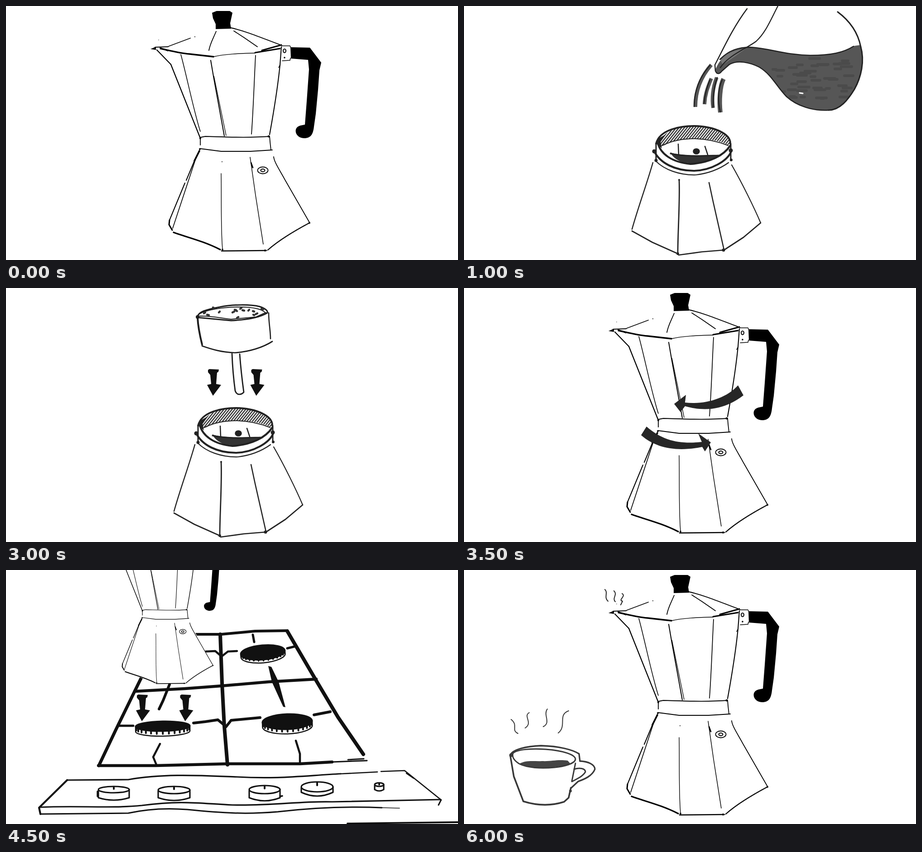
An HTML page that plays this animation: 998 by 561 pixels, repeating every 6.5 s.

```html
<!DOCTYPE html>
<html lang="en">
<head>
<meta charset="utf-8">
<title>Moka pot</title>
<style>
html, body { margin: 0; width: 100%; height: 100%; overflow: hidden; background: #fff; }
svg { display: block; width: 100%; height: 100%; }
</style>
</head>
<body>
<svg id="stage" viewBox="0 0 998 561" fill="none" stroke-linecap="round" stroke-linejoin="round"></svg>
<script>
const STEP = 500;
const stage = document.getElementById('stage');

const line = (d, w = 2) => `<path d="${d}" stroke-width="${w}"/>`;
const solid = (d, c = 'currentColor') => `<path d="${d}" fill="${c}" stroke="none"/>`;
const dot = (x, y, r) => `<circle cx="${x}" cy="${y}" r="${r}" fill="currentColor" stroke="none"/>`;
const oval = (x, y, rx, ry, w = 2, fill = 'none') =>
  `<ellipse cx="${x}" cy="${y}" rx="${rx}" ry="${ry}" stroke-width="${w}" fill="${fill}"/>`;
const ink = (color, ...parts) => `<g color="${color}" stroke="${color}">${parts.join('')}</g>`;
const at = (transform, part) => `<g transform="${transform}">${part}</g>`;
const range = (n, f) => Array.from({ length: n }, (_, i) => f(i)).join('');

function random(seed) {
  return () => (seed = seed * 16807 % 2147483647) / 2147483647;
}

function makePot() {
  return ink('#000',
    solid('M333 94L464 46 495 46 609 88 582 290 590 330 670 479 577 541 475 541 365 497 359 480 428 310 428 290 364 129Z', '#fff'),
    solid('M455 15L465 11 494 11 500 15 495 38 497 50 463 51 463 40 457 27Z'),
    line('M496 48C532 56 568 72 609 87', 1.8),
    line('M464 56C456 75 451 82 448 98M503 55L526 70 555 90M407 71Q375 83 359 89', 1.8),
    dot(417, 68, 1), dot(337, 75, .7),
    solid('M319 95L331 90 331 97Z'),
    line('M329 91L358 90M340 92L357 99M333 97L364 129', 2.2),
    line('M364 129L429 292', 2.2),
    line('M341 94C360 98 382 104 405 106L458 112', 3.4),
    line('M458 112C478 107 520 104 550 104', 1.5),
    line('M550 103L605 94M565 98L608 86', 3),
    line('M386 107C398 150 414 230 429 277', 1.6),
    line('M452 120L458 155 482 287', 2),
    line('M459 155L486 286', 1.3),
    line('M551 109C548 165 546 230 542 283', 1.7),
    line('M605 130C600 180 590 240 582 284M608 90L605 130', 2.1),
    line('M609 88L627 88 630 95M610 121L627 120 628 115M602 136L605 130', 1.5),
    oval(615, 99, 3, 4, 2), dot(615, 114, 1.8),
    solid('M628 91L671 92 696 125 692 142 689 185 684 238 680 266C678 286 671 292 658 292C639 292 632 269 650 264L660 262 664 210 669 140 667 119 629 116Z'),
    line('M430 290L440 288C480 289 530 292 582 288L583 300 585 318M429 292V307', 1.8),
    line('M429 315L475 321 540 321 588 318', 1.8),
    dot(429, 292, 2.2), dot(580, 288, 2.4), dot(428, 316, 2),
    line('M427 320L416 342', 3.8),
    line('M416 342L398 385M395 391L361 473', 2),
    line('M418 340L368 491', 1.7),
    line('M361 473L360 483 367 495', 3),
    line('M370 500C400 511 436 519 473 538', 3.2),
    line('M476 541L575 540', 2.5),
    line('M578 539C605 515 640 495 670 479', 2.3),
    line('M591 333C592 345 606 365 616 384L670 478', 1.8),
    line('M475 370C476 420 474 490 478 536', 1.4),
    line('M539 334L551 418 568 526', 1.5),
    line('M541 346L545 357', 2.6),
    dot(477, 344, 1), dot(670, 479, 2), dot(478, 538, 2), dot(572, 540, 2.2),
    oval(567, 363, 11.5, 7.5, 1.8), oval(567, 363, 4.5, 3, 2));
}

function makeBase() {
  const band = 'M428 304C444 271 478 266 510 266C560 267 586 282 588 303L583 307C566 298 540 293 510 293C482 293 458 298 438 310Z';
  const hatch = range(34, i => `M${392 + i * 6} 312L${432 + i * 6} 262`);
  return ink('#222',
    `<clipPath id="band"><path d="${band}"/></clipPath>`,
    `<g clip-path="url(#band)">${solid(band, '#e4e4e4')}${line(hatch, 2)}</g>`,
    line('M424 304C432 272 480 265 508 265C555 266 589 283 588 304', 3.8),
    line('M438 308C458 298 482 293 510 293C542 294 568 302 583 308', 2),
    solid('M424 304L431 292 446 283 434 300 437 314Z'),
    solid('M455 323C472 331 530 331 564 329C548 346 510 351 482 345C468 340 459 331 455 323Z', '#333'),
    line('M456 326C490 333 525 331 562 330', 3),
    line('M473 305L474 328M532 310L538 328', 2.5),
    oval(513, 321, 6, 5, 3.5, '#222'),
    line('M428 303C434 326 458 345 500 349C543 346 574 330 588 308', 4.2),
    line('M420 321C433 347 466 364 508 364C546 363 582 342 590 321', 4.2),
    line('M424 343C442 361 475 374 512 373C546 369 570 356 584 346', 2.2),
    line('M424 304L424 342M589 304V341', 3),
    dot(420, 321, 4.5), dot(424, 341, 3.5), dot(589, 319, 4.5), dot(590, 340, 3),
    line('M417 346C404 392 384 446 371 493', 2.4),
    line('M371 497L416 522 472 547', 2.7),
    line('M475 384C477 430 472 500 472 547', 2.8),
    line('M541 390L550 432 574 538', 2.5),
    line('M474 550L525 543 574 539 617 511 655 479', 2.7),
    line('M591 351C614 391 641 446 655 479', 2.2),
    dot(475, 384, 2), dot(472, 547, 3), dot(573, 539, 3.5));
}

function makeJug() {
  const rnd = random(7);
  const marks = range(45, () => {
    const x = 680 + rnd() * 170, y = 116 + rnd() * 95;
    return `M${x.toFixed()} ${y.toFixed()}h${(6 + rnd() * 18).toFixed()}`;
  });
  const water = 'M560 130C575 104 602 91 632 91C675 92 705 108 765 109C810 109 838 104 862 88L876 86C884 112 880 150 862 184C848 207 830 230 805 230C770 232 735 221 712 200C690 178 680 152 652 135C625 123 600 119 585 130L568 146C560 152 555 146 556 138Z';
  return ink('#222',
    solid(water, '#565656'),
    `<clipPath id="water"><path d="${water}"/></clipPath>`,
    `<g clip-path="url(#water)" stroke="#4b4b4b">${line(marks, 6)}</g>`,
    solid('M566 118C579 104 600 96 621 95L600 110 571 130Z', '#777'),
    line('M625 6C592 50 570 100 554 130L555 143C558 151 564 151 569 144L586 129', 2.5),
    line('M693 0C675 35 665 60 645 78C624 94 585 108 566 136', 2.3),
    line('M565 118C585 98 606 91 632 91C680 94 705 108 765 109C810 109 838 103 860 89', 2.5),
    line('M586 129C604 119 630 124 652 135C680 152 690 178 712 200C735 221 770 232 805 230', 2.5),
    line('M825 13C852 33 870 60 876 90C885 122 877 157 862 184C848 207 830 230 805 230', 3),
    `<path d="M741 192L748 193" stroke="#fff" stroke-width="3"/>`,
    `<g stroke="#555" stroke-linecap="butt">${
      line('M546 130C524 155 511 185 511 223', 8)}${
      line('M546 160C538 180 532 195 531 217', 8)}${
      line('M558 158C549 180 547 205 550 225', 8)}${
      line('M573 161C565 177 563 210 566 235', 10)}</g>`,
    line('M543 131C520 157 508 187 508 222M543 163Q533 186 530 215M559 158C550 185 550 206 550 224M570 163C560 185 560 209 566 234', 2.5));
}

function makeBasket() {
  return ink('#1c1c1c',
    line('M423 290C425 280 440 275 472 269C500 263 540 263 560 268C574 273 579 278 577 282C562 291 540 297 497 299L422 292', 3),
    line('M427 284C445 275 475 270 510 269C548 268 565 275 571 280M427 289C455 288 475 294 497 296L552 291 574 281', 2),
    line('M423 292C424 315 429 336 433 352', 4),
    line('M580 282C580 305 584 320 584 339', 2.5),
    line('M433 355C456 363 477 369 505 370C537 368 568 358 588 345', 2.7),
    line('M499 372C500 400 503 432 506 454C510 465 520 463 525 457C521 428 518 400 516 373', 2.8),
    dot(423, 291, 4));
}

function makeGrounds() {
  const spots = [[459, 270], [439, 283], [446, 286], [472, 281], [507, 275], [502, 281], [510, 277], [519, 273],
    [524, 276], [537, 277], [547, 278], [553, 285], [548, 286], [512, 293], [566, 273]];
  return ink('#333', spots.map(([x, y], i) =>
    line(`M${x - 2} ${y}l${2 + i % 3} ${i % 2 ? -2 : 1}`, 4.5)).join(''));
}

function makeScoop() {
  const rnd = random(23);
  const fall = range(24, () => dot((500 + rnd() * 60).toFixed(), (165 + rnd() * 100).toFixed(), 2.5));
  const bowl = 'M552 140C582 112 630 92 672 93C684 130 665 174 628 181C598 184 572 165 552 140Z';
  return ink('#222',
    solid(bowl, '#444'), line(bowl, 3),
    line('M673 94L875 2M677 113L905 8', 3),
    fall, dot(606, 372, 2.5), dot(612, 408, 2.5));
}

function arrows(dx, dy) {
  return at(`translate(${dx} ${dy})`, downArrow + at('translate(95.5 0)', downArrow));
}

function burner(x, y, rx, ry, h, tilt) {
  const teeth = range(13, i => {
    const a = Math.PI * (i + 1) / 14, c = Math.cos(a) * rx, s = Math.sin(a) * ry;
    return `M${c.toFixed(1)} ${(s - 2).toFixed(1)}v${h - 3}`;
  });
  return at(`translate(${x} ${y}) rotate(${tilt})`,
    solid(`M${-rx} 0v${h}A${rx} ${ry} 0 0 0 ${rx} ${h}V0Z`, '#fff') +
    line(`M${-rx} 0v${h}A${rx} ${ry} 0 0 0 ${rx} ${h}V0`, 2.5) +
    line(teeth, 4) + oval(0, 0, rx, ry, 3, '#111'));
}

function knob(x, y, rx, ry, h) {
  return line(`M${x - rx} ${y + 2}V${y + h}Q${x} ${y + h + ry * 1.5} ${x + rx} ${y + h}V${y}`, 3.2) +
    oval(x, y, rx, ry, 3.2) + line(`M${x} ${y - ry + 2}v${ry * .5}`, 4);
}

function makeStove() {
  return ink('#111',
    line('M205 432L242 354 284 268 344 146', 7),
    line('M344 146L420 142 475 142 550 135 621 134', 6),
    line('M621 135L683 241 733 325 789 407', 8),
    line('M204 432L330 432 490 428 650 428 720 424', 6.5),
    line('M720 424L797 421M755 419L790 417', 3),
    line('M473 142L477 250 482 345 489 430', 8),
    line('M284 268L395 262 475 256 580 247 685 241', 6.5),
    line('M250 344H281', 5),
    line('M361 253L347 288 338 307', 6),
    line('M414 338L440 335 467 331M468 331L486 346 497 332 561 326', 6),
    line('M340 384L325 413 332 430M640 377L649 406 649 425', 4.5),
    solid('M579 212L586 214 602 247 617 303 612 302 587 247Z'),
    line('M545 143L548 159M621 173L637 169', 5),
    line('M441 180L462 179 476 191 490 180 510 179', 4.5),
    line('M680 320L716 313', 6),
    burner(387, 184, 48, 15, 7, -3),
    burner(567, 182, 49, 16, 7, -5),
    burner(346, 345, 60, 11, 11, -1),
    burner(621, 335, 55, 17, 10, -2),
    line('M135 464L270 463C350 449 430 454 510 457C600 462 650 455 740 450', 3.2),
    line('M742 450L820 446M828 445L880 443 961 508M884 449L900 460', 2.6),
    line('M135 464L73 525 76 539', 4.2),
    line('M74 524C160 520 230 527 300 520C390 508 430 516 500 519C590 521 650 510 720 512L960 507', 3.2),
    line('M76 539L270 537C310 528 350 525 400 529C480 537 530 540 600 534C680 525 760 522 830 525', 3),
    line('M830 525L869 526', 1.6),
    line('M960 509L955 519', 3),
    line('M754 560L998 557', 4),
    knob(238, 485, 34, 7, 18), knob(371, 486, 35, 8, 17),
    knob(571, 485, 34, 9, 18), knob(687, 479, 35, 11, 12),
    knob(824, 474, 10, 4, 11), line('M202 489V500M605 500L610 499', 3.5));
}

function makeCup() {
  return ink('#383838',
    solid('M122 428C138 419 155 423 172 422C194 423 205 418 229 421L236 429C215 434 185 437 157 438Z', '#444'),
    line('M102 410C105 396 140 389 170 388C210 389 240 397 254 406L256 422', 3.3),
    line('M108 405C116 396 150 394 180 396C220 399 246 408 246 418C245 428 220 434 200 436C170 439 140 437 122 428C109 420 106 412 108 405Z', 3),
    line('M102 409L110 456 131 511C160 520 190 522 221 512L231 503 236 481', 3.6),
    line('M246 427L238 467', 3),
    line('M256 422C275 423 289 430 289 440C283 455 266 462 252 467L236 482', 3.3),
    line('M243 440C255 436 268 438 268 446C262 456 250 461 239 467', 3),
    dot(104, 409, 4), dot(235, 488, 3),
    line('M104 330C121 344 103 353 119 361M144 315C130 323 153 337 135 349M184 307C174 320 193 337 175 346M231 311C206 320 228 344 208 360', 2));
}

const downArrow = ink('#111', solid('M446 181L449 179 470 180 469 185 466 187 464 212 475 214 457 238 444 214 453 212 451 192 446 186Z'));
const topTurn = ink('#262626', solid('M605 215L617 237C582 264 540 276 488 261L478 274 464 256 490 236 488 253C530 258 578 245 605 215Z'));
const lowTurn = ink('#262626', solid('M403 306C440 339 480 345 525 340L517 321 545 341 532 361 526 351C472 362 425 355 391 325Z'));
const steam = ink('#222', line('M311 43C319 50 308 60 318 69M331 46C340 55 326 62 334 70M349 52C359 58 339 66 350 69L346 77', 2));

const pot = makePot(), base = makeBase(), basket = makeBasket(), stove = makeStove();
const filled = basket + makeGrounds();
const pouring = base + makeJug();
const smallPot = (x, y) => at(`translate(${x} ${y}) scale(.646)`, pot);
const placed = stove + smallPot(14, 37.5);

const scenes = [
  pot,
  pot + at('translate(1092 0) scale(-1 1)', topTurn) + at('translate(931 3) scale(-1 1)', lowTurn),
  pouring,
  pouring + at('translate(591 324) rotate(90) scale(1.65) translate(-459.5 -208.5)', downArrow),
  basket,
  filled + makeScoop(),
  base + at('translate(0 -227)', filled) + arrows(0, 0),
  pot + topTurn + lowTurn,
  stove,
  stove + smallPot(24, -98.5) + arrows(-157, 96),
  placed,
  placed + at('translate(-101 0)', steam),
  pot + steam + makeCup()
];

stage.innerHTML = '<rect width="998" height="561" fill="#fff"/><g id="scene"></g>';

const view = document.getElementById('scene');
let shown = -1;

function render(time) {
  const i = Math.floor(time / STEP) % scenes.length;
  if (i !== shown) view.innerHTML = scenes[shown = i];
}

const start = performance.now();
function tick() {
  render(performance.now() - start);
  requestAnimationFrame(tick);
}
tick();
</script>
</body>
</html>
```
